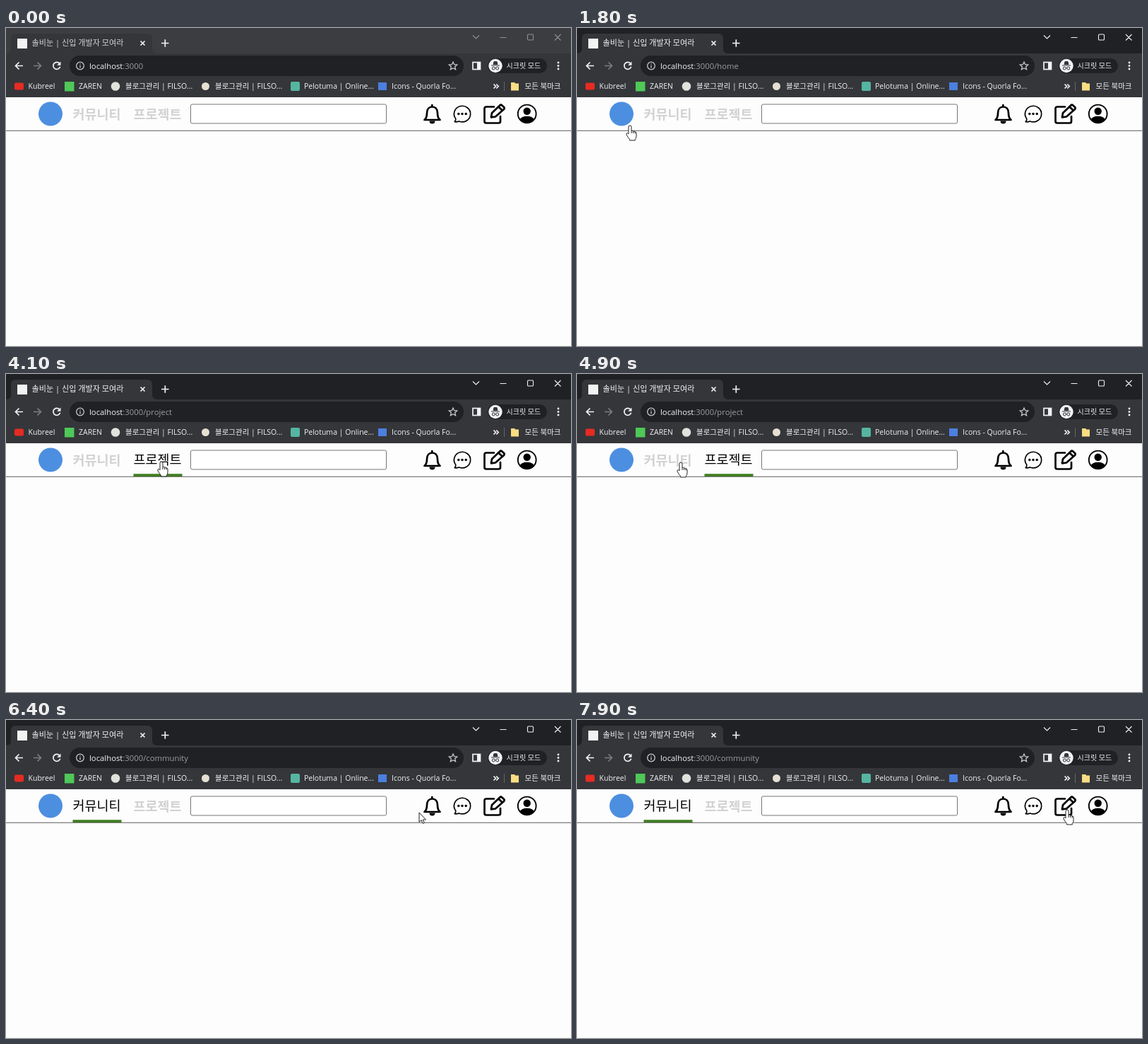
An HTML page for the animation above (8000 ms loop, 800 by 450 pixels).

```html
<!DOCTYPE html>
<html lang="ko">
<head>
<meta charset="utf-8">
<title>Browser navigation</title>
<style>
  html, body { margin: 0; width: 100%; height: 100%; overflow: hidden; background: #fefdfe; }
  svg { display: block; width: 800px; height: 450px; }
  text { font-family: "Open Sans", "Noto Sans CJK KR", "Noto Sans CJK JP", "Noto Sans CJK", sans-serif; fill: #f1f2f4; }
  .line { fill: none; stroke: #f1f2f4; stroke-width: 1.7; }
  .marks text { font-size: 10.5px; }
  .url { font-size: 11.3px; }
  .icons { fill: none; stroke: #000; stroke-width: 2.7; stroke-linejoin: round; stroke-linecap: round; }
  .solid { fill: #000; stroke: none; }
  .frame { fill: #202124; }
  .controls { fill: none; stroke: #f1f2f4; stroke-width: 1.1; }
  .idle .frame { fill: #3c3d41; }
  .idle .controls { stroke: #909194; }
  .idle .title { fill: #d3d4d6; }
  .link text { font-size: 18.5px; font-weight: 700; fill: #d2d2d2; }
  .link rect { fill: #3f7d20; visibility: hidden; }
  .link.on text { font-weight: 500; fill: #000; transform: translateY(-1px); }
  .link.on rect { visibility: visible; }
  .pointer { fill: #fff; stroke: #222; stroke-width: 1; stroke-linejoin: round; }
</style>
</head>
<body>
<svg id="stage" class="idle" viewBox="0 0 800 450">
  <rect width="800" height="450" fill="#fefdfe"/>

  <!-- tab strip -->
  <rect class="frame" width="800" height="37"/>
  <path d="M0 36Q7 36 7 29V15Q7 8 14 8H200Q207 8 207 15V29Q207 36 214 36V37H0Z" fill="#35363a"/>
  <rect x="16" y="15" width="14" height="14" fill="#f2f2f2"/>
  <text class="title" x="36.5" y="25.3" font-size="11.1">솔비눈 | 신입 개발자 모여라</text>
  <path class="line" stroke-width="1.4" d="M190.5 18.5l6 6m0-6l-6 6M220 21.5h10.500M225.300 16.300v10.500"/>
  <path class="controls" d="M661 10.500l4.500 4.500 4.500-4.500M699.500 13.500h9M777 9l8.500 8.500m0-8.500l-8.500 8.500"/>
  <rect class="controls" x="738.500" y="9" width="8" height="8" rx="1.300"/>

  <!-- toolbar -->
  <rect y="36" width="800" height="62" fill="#35363a"/>
  <path class="line" d="M24 53.500H13.500m5-5l-5 5 5 5"/>
  <path class="line" style="stroke:#7b7c80" d="M39 53.500h10.500m-5-5l5 5-5 5"/>
  <path class="line" d="M75.800 50.200A5 5 0 1 0 76.700 54.800"/>
  <path d="M77.500 47.500v5.300h-5.300z" fill="#f1f2f4"/>
  <rect x="90" y="39" width="558" height="29" rx="14.500" fill="#202124"/>
  <g stroke="#c6c8cb" fill="none" stroke-width="1.300">
    <circle cx="105" cy="53.500" r="5.300"/>
    <path d="M105 52.700v3.700M105 50.300v1.300"/>
    <path d="M633 48l1.700 3.700 4 .4-3 2.700.9 4-3.600-2.100-3.600 2.100.9-4-3-2.700 4-.4z"/>
  </g>
  <text class="url" x="118" y="57.600">localhost<tspan fill="#9b9da1">:3000<tspan id="path"></tspan></tspan></text>
  <rect class="line" x="661" y="48.500" width="10.500" height="10" stroke-width="1.500"/>
  <rect x="667" y="48" width="5" height="11" fill="#f1f2f4"/>
  <rect x="682" y="43" width="84" height="21" rx="10.500" fill="#202124"/>
  <circle cx="693" cy="53.500" r="9.700" fill="#f1f2f4"/>
  <path d="M687 53h12M690 51.500l1-4h4l1 4z" fill="#35363a" stroke="#35363a"/>
  <path d="M688.300 57a2 2 0 1 0 4 0a2 2 0 1 0-4 0m5.400 0a2 2 0 1 0 4 0a2 2 0 1 0-4 0m-1.400-.5h1.400" fill="none" stroke="#35363a"/>
  <text x="708.500" y="57.200" font-size="10" font-weight="500">시크릿 모드</text>
  <g fill="#f1f2f4">
    <circle cx="782" cy="49" r="1.400"/><circle cx="782" cy="53.500" r="1.400"/><circle cx="782" cy="58" r="1.400"/>
  </g>

  <!-- bookmarks -->
  <g class="marks">
    <rect x="12" y="77.500" width="13" height="10" rx="2" fill="#e62b22"/>
    <text x="31.500" y="86.300">Kubreel</text>
    <rect x="83" y="76" width="13.500" height="13.500" fill="#4fc858"/>
    <text x="103" y="86.300">ZAREN</text>
    <circle cx="155" cy="82.500" r="6.300" fill="#dfe3dc"/>
    <text x="169" y="86.300">블로그관리 | FILSO...</text>
    <circle cx="282.500" cy="82.500" r="5.500" fill="#e5e0d2"/>
    <text x="296" y="86.300">블로그관리 | FILSO...</text>
    <rect x="403" y="76" width="13" height="13" rx="2" fill="#55b5a0"/>
    <text x="422" y="86.300">Pelotuma | Online...</text>
    <rect x="527" y="77" width="12" height="11" fill="#4b7fe0"/>
    <text x="546" y="86.300">Icons - Quorla Fo...</text>
    <path class="line" stroke-width="1.300" d="M690.500 79.500l3 3-3 3m3.700-6l3 3-3 3"/>
    <path d="M705.500 76v13" stroke="#66676b"/>
    <path d="M715 77h5l1.500 1.500h4.500V88.500h-11z" fill="#f9dd83"/>
    <text x="734.500" y="86.300" font-size="11">모든 북마크</text>
  </g>

  <!-- page header -->
  <path d="M0 145.300H800" stroke="#7c7c7c" stroke-width="1.300"/>
  <circle cx="63" cy="121.500" r="17" fill="#4c8fe0"/>
  <g class="link" data-path="/community">
    <text x="94.500" y="129">커뮤니티</text>
    <rect x="94.500" y="141.300" width="69" height="3.700"/>
  </g>
  <g class="link" data-path="/project">
    <text x="180.500" y="129">프로젝트</text>
    <rect x="180.500" y="141.300" width="69" height="3.700"/>
  </g>
  <rect x="261.500" y="108" width="277" height="27" rx="2" fill="#fff" stroke="#767676"/>

  <g class="icons">
    <path d="M603.300 109v2.500M592.500 130H614.500Q611 127 611 120.500C611 114.500 607.500 111.500 603.500 111.500S596 114.500 596 120.500Q596 127 592.500 130Z"/>
    <path class="solid" d="M599.500 131.500h8a4 4 0 0 1-8 0z"/>
    <path stroke-width="1.700" d="M635.300 132.700Q637.300 130.700 636.700 128.300A11.600 11.300 0 1 1 641.500 132Q638.500 133.300 635.300 132.700Z"/>
    <g class="solid">
      <circle cx="640.800" cy="121.500" r="1.700"/><circle cx="646" cy="121.500" r="1.700"/><circle cx="651.200" cy="121.500" r="1.700"/>
    </g>
    <path d="M691 111.500H680Q677.500 111.500 677.500 114V132Q677.500 134.500 680 134.500H697.500Q700 134.500 700 132V125"/>
    <path d="M687 125.500L688 120.300 699.200 109.500Q700.700 108 702.300 109.500L705 112Q706.300 113.500 705 115L693 125.500 687 126.300ZM697.500 111.500l5.300 5.300"/>
    <circle cx="737.700" cy="121.500" r="12.900" stroke-width="1.900"/>
    <circle class="solid" cx="737.700" cy="117.700" r="5.200"/>
    <path class="solid" d="M727.500 129.500Q730 124.700 737.700 124.700T748 129.500Q744 134.500 737.700 134.500T727.500 129.500Z"/>
  </g>

  <g id="cursor">
    <path class="pointer" data-kind="arrow" d="M0 0V13.500L3.200 10.700 5.400 15.500 7.400 14.600 5.300 10H9.500Z"/>
    <path class="pointer" data-kind="hand" d="M-2 1Q-2-1 0-1T2 1V6.500Q3.600 5.300 4.500 7.200 6.200 6.200 7 8 9 7.500 9 10V14Q9 17 7.300 18.500V20H-.5V18.500Q-3 15.500-5 12-5.500 9.500-3.500 9.500L-2 11ZM2 6.500V10M4.500 7.200V10M7 8V10.500"/>
    <path data-kind="beam" d="M-3-8Q0-8 0-6Q0-8 3-8M0-7V7M-3 8Q0 8 0 6Q0 8 3 8" fill="none" stroke="#222"/>
  </g>
</svg>
<script>
  const LOOP = 8000, STEP = 100, ACTIVATE = 1100;
  const routes = [[0, ""], [1800, "/home"], [2900, "/community"], [4100, "/project"], [5200, "/community"]];
  // time, x, y of the pointer tip
  const trail = [
    [1000, 128, 182], [1400, 75, 139], [1800, 75, 139], [2600, 147, 128],
    [2900, 147, 128], [3700, 220, 125], [4200, 220, 125], [4800, 147, 126],
    [5300, 147, 126], [5700, 250, 127], [6400, 585, 131], [6500, 606, 127],
    [6600, 634, 126], [7500, 637, 126], [7900, 694, 128]
  ];
  // left, top, right, bottom
  const hot = [
    [43, 103, 83, 141], [94, 106, 163, 145], [181, 106, 251, 145],
    [590, 106, 617, 137], [632, 106, 660, 137], [675, 106, 708, 137]
  ];
  const field = [262, 108, 538, 135];

  const stage = document.getElementById("stage");
  const path = document.getElementById("path");
  const cursor = document.getElementById("cursor");
  const links = document.querySelectorAll(".link");
  const inside = (x, y, [l, t, r, b]) => x >= l && x <= r && y >= t && y <= b;

  function tipAt(t) {
    const next = trail.findIndex(p => p[0] > t);
    if (next < 0) return trail[trail.length - 1].slice(1);
    const [t0, x0, y0] = trail[next - 1], [t1, x1, y1] = trail[next];
    const u = (t - t0) / (t1 - t0), k = u * u * (3 - 2 * u);
    return [x0 + (x1 - x0) * k, y0 + (y1 - y0) * k];
  }

  function drawCursor(t) {
    const shown = t >= trail[0][0];
    cursor.style.display = shown ? "" : "none";
    if (!shown) return;
    const [x, y] = tipAt(t).map(Math.round);
    const kind = hot.some(box => inside(x, y, box)) ? "hand" : inside(x, y, field) ? "beam" : "arrow";
    cursor.setAttribute("transform", `translate(${x} ${y})`);
    for (const shape of cursor.children) shape.style.display = shape.dataset.kind === kind ? "" : "none";
  }

  function draw(t) {
    const route = routes.filter(r => r[0] <= t).pop()[1];
    path.textContent = route;
    for (const link of links) link.classList.toggle("on", link.dataset.path === route);
    stage.classList.toggle("idle", t < ACTIVATE);
    drawCursor(t);
  }

  const start = performance.now();
  function tick() {
    const t = (performance.now() - start) % LOOP;
    draw(Math.floor(t / STEP) * STEP);
    requestAnimationFrame(tick);
  }
  tick();
</script>
</body>
</html>
```
